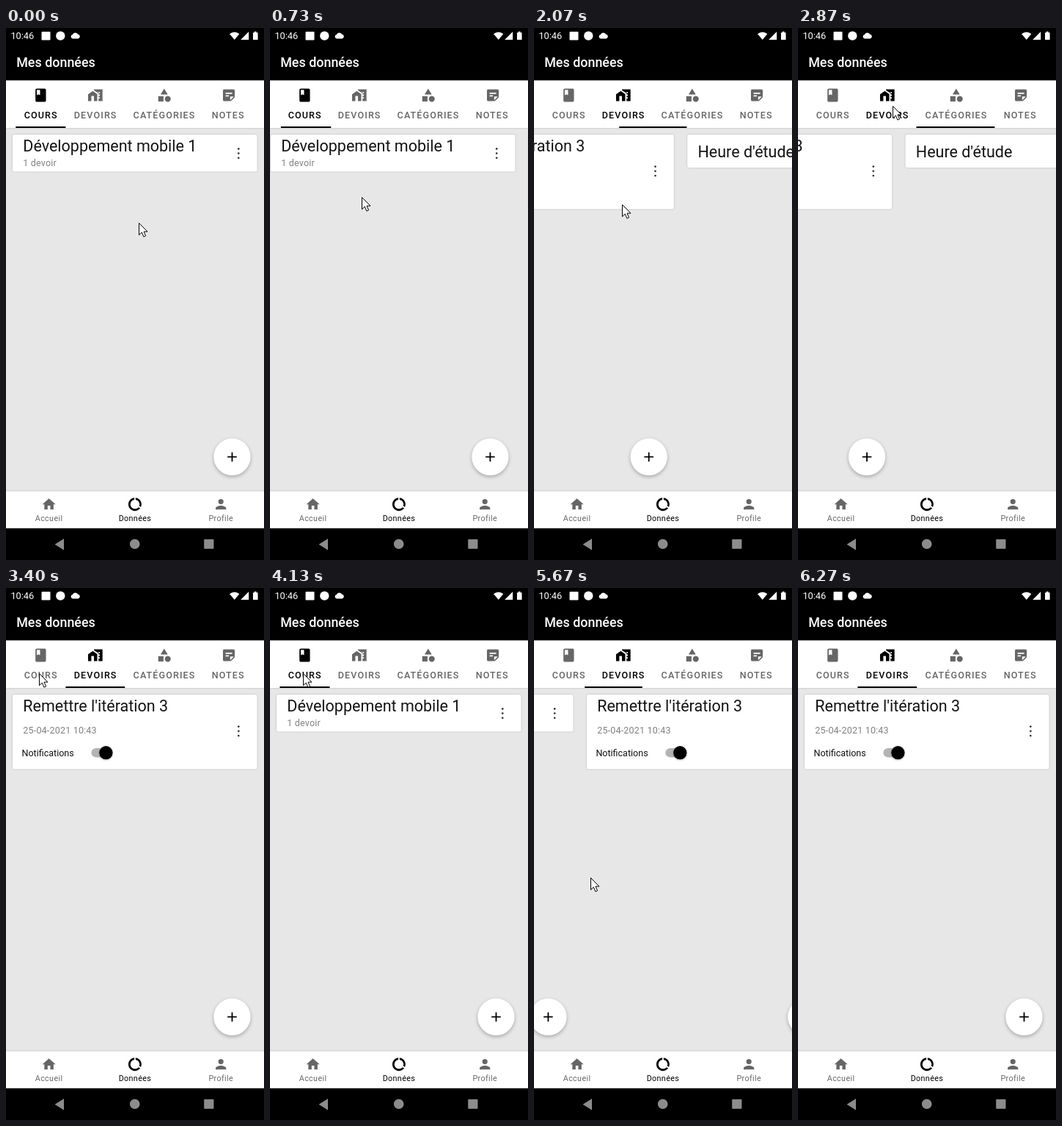
Write an HTML page that moves like this. It is 352 px wide and 724 px high and loops after 6.79 s.

```html
<!DOCTYPE html>
<html lang="fr">
<head>
<meta charset="utf-8">
<title>Mes données</title>
<style>
  html, body { margin: 0; width: 100%; height: 100%; overflow: hidden; background: #e7e7e7; }
  svg { display: block; width: 352px; height: 724px; font-family: Roboto, sans-serif; }
  .head { font-size: 17.9px; font-weight: 500; fill: #fff; }
  .tab { fill: #666; }
  .tab text { font-size: 12.54px; font-weight: 500; letter-spacing: .0893em; }
  .nav { fill: #666; }
  .nav text { font-size: 10.75px; letter-spacing: .0333em; text-anchor: middle; }
  .tab.on, .nav.on { fill: #000; }
  .card { fill: #fff; filter: drop-shadow(0 .8px .9px rgba(0, 0, 0, .22)); }
  .title { font-size: 21.5px; fill: #141414; }
  .sub { font-size: 12.54px; letter-spacing: .0145em; fill: #808080; }
  .label { font-size: 12.54px; fill: #111; }
  .fab circle { fill: #fff; filter: drop-shadow(0 2.5px 2.5px rgba(0, 0, 0, .28)); }
  .fab path { stroke: #000; stroke-width: 1.8; }
  .thumb { filter: drop-shadow(0 1px 1px rgba(0, 0, 0, .3)); }
  .bar { fill: #fff; filter: drop-shadow(0 .5px 1px rgba(0, 0, 0, .25)); }
</style>
</head>
<body>
<svg viewBox="0 0 352 724">
  <defs>
    <g id="fab" class="fab"><circle cx="308.5" cy="583.7" r="25.1"/><path d="M302.2 583.7h12.6M308.5 577.4v12.6"/></g>
    <g id="dots" fill="#333"><circle cy="-6.2" r="1.35"/><circle r="1.35"/><circle cy="6.2" r="1.35"/></g>
  </defs>

  <rect width="352" height="724" fill="#e7e7e7"/>
  <g id="pages">
    <g>
      <rect class="card" x="9" y="145" width="333.6" height="50.6" rx="2.5"/>
      <text class="title" x="23.3" y="168">Développement mobile 1</text>
      <text class="sub" x="23.3" y="187.5">1 devoir</text>
      <use href="#dots" x="317.3" y="170.6"/>
      <use href="#fab"/>
    </g>
    <g transform="translate(352)">
      <rect class="card" x="9" y="145" width="333.6" height="101.4" rx="2.5"/>
      <text class="title" x="23.3" y="168">Remettre l'itération 3</text>
      <text class="sub" x="23.3" y="198.3">25-04-2021 10:43</text>
      <use href="#dots" x="317.3" y="194.8"/>
      <text class="label" x="21.5" y="228.8">Notifications</text>
      <rect x="116.5" y="218" width="27" height="12.4" rx="6.2" fill="#b3b3b3"/>
      <circle class="thumb" cx="136.4" cy="224.2" r="9.1"/>
      <use href="#fab"/>
    </g>
    <g transform="translate(704)">
      <rect class="card" x="9" y="145" width="333.6" height="45" rx="2.5"/>
      <text class="title" x="23.3" y="176">Heure d'étude</text>
      <use href="#fab"/>
    </g>
  </g>

  <rect class="bar" y="70" width="352" height="66"/>
  <rect width="352" height="71.3"/>
  <g fill="#fff">
    <text x="6.4" y="15.3" font-size="12.8">10:46</text>
    <rect x="48.5" y="5" width="12" height="11.5" rx="1"/>
    <circle cx="74.3" cy="10.6" r="6.2"/>
    <path d="M91 14.5a2.8 2.8 0 0 1-.3-5.5a4 4 0 0 1 7.3-.4a3 3 0 0 1 .6 5.9z"/>
    <path d="M305 8Q311.7 2.8 318.4 8L311.7 16z"/>
    <path d="M331.2 5v11h-11z"/>
    <path d="M337 6.2h2v-1.4h2.6v1.4h2v9.9h-6.6z"/>
  </g>
  <text class="head" x="14.2" y="53.4">Mes données</text>

  <g id="tabs"></g>
  <rect id="line" y="134" height="2"/>

  <rect class="bar" y="630.4" width="352" height="52"/>
  <g id="nav"></g>
  <rect y="680.8" width="352" height="43.2"/>
  <g fill="#8c8c8c">
    <path d="M79 695v15.4l-12.4-7.7z"/>
    <circle cx="175.7" cy="702.3" r="6.8"/>
    <rect x="270.2" y="695.8" width="13.2" height="13" rx=".8"/>
  </g>
  <path id="cursor" d="M.5.5v16.2l3.8-3.6l2.6 6l2.7-1.2l-2.6-5.8h5z" fill="#fff" stroke="#000"/>
</svg>
<script>
  const WIDTH = 352, LOOP = 6790, FPS = 15;
  const byId = id => document.getElementById(id);
  const lerp = (a, b, k) => a + (b - a) * k;
  const clamp = k => Math.min(1, Math.max(0, k));

  const icons = {
    book: 'M18 2H6c-1.1 0-2 .9-2 2v16c0 1.1.9 2 2 2h12c1.1 0 2-.9 2-2V4c0-1.1-.9-2-2-2zM6 4h5v8l-2.5-1.5L6 12z',
    homework: 'M8.2 5.7L1 10.5V21h5v-8h4v8h5V10.3zM10 3v1.5L13.7 7H15v.9l2 1.3V21h6V3zM17 7h2v2h-2zM17 11h2v2h-2zM17 15h2v2h-2z',
    category: 'M12 2l-5.5 9h11zM3 13.5h8v8H3zM17.5 13a4.5 4.5 0 1 0 .01 0z',
    note: 'M19 3H5c-1.1 0-2 .9-2 2v14c0 1.1.9 2 2 2h10l6-6V5c0-1.1-.9-2-2-2zM7 8h10v2H7zM12 14H7v-2h5zM14 19.5V14h5.5z',
    home: 'M10 20v-6h4v6h5v-8h3L12 3 2 12h3v8z',
    data: 'M13 2.05v3.03a7 7 0 0 1 5.52 9.46l2.6 1.53A10 10 0 0 0 13 2.05zM12 19a7 7 0 0 1-1-13.92V2.05a10 10 0 1 0 9.05 15.86l-2.6-1.53A7 7 0 0 1 12 19z',
    person: 'M12 12a4 4 0 1 0 0-8a4 4 0 0 0 0 8zM12 14c-2.67 0-8 1.34-8 4v2h16v-2c0-2.66-5.33-4-8-4z'
  };
  const icon = (name, cx, cy) =>
    `<path fill-rule="evenodd" transform="translate(${cx - 10.75} ${cy - 10.75}) scale(.896)" d="${icons[name]}"/>`;

  const edges = [13.3, 81.4, 162.2, 269.4, 338.7];
  byId('tabs').innerHTML = [['book', 'COURS'], ['homework', 'DEVOIRS'], ['category', 'CATÉGORIES'], ['note', 'NOTES']]
    .map(([name, text], i) => `<g class="tab">${icon(name, (edges[i] + edges[i + 1]) / 2, 91.5)}` +
      `<text x="${edges[i] + 11.4}" y="123">${text}</text></g>`).join('');
  byId('nav').innerHTML = [['home', 'Accueil'], ['data', 'Données'], ['person', 'Profile']]
    .map(([name, text], i) => {
      const x = 58.6 + 117.3 * i;
      return `<g class="nav${i === 1 ? ' on' : ''}">${icon(name, x, 648.2)}<text x="${x}" y="671.3">${text}</text></g>`;
    }).join('');
  const tabs = [...document.querySelectorAll('.tab')];

  // Pointer path: time, x, y
  const path = [
    [0, 181, 265], [330, 172, 242], [667, 146, 231], [733, 125, 230], [1090, 30, 236],
    [1467, 258, 254], [1733, 282, 256], [1800, 282, 256], [2067, 120, 240], [2533, 130, 131],
    [2667, 129, 106], [3000, 129, 106], [3400, 45, 116], [4867, 45, 116], [5230, 184, 300],
    [5333, 153, 307], [5530, 45, 312], [6200, 200, 712], [6267, 206, 745]
  ];
  function pointer(t) {
    const i = path.findIndex(p => p[0] > t);
    if (i < 0) return path[path.length - 1].slice(1);
    const a = path[i - 1], b = path[i], k = (t - a[0]) / (b[0] - a[0]);
    return [lerp(a[1], b[1], k), lerp(a[2], b[2], k)];
  }

  // A swipe has a down time and the x where dragging takes hold; a tap only a release time
  const moves = [
    { from: 0, to: 1, down: 667, up: 1090, hold: 133 },
    { from: 1, to: 2, down: 1800, up: 2067, hold: 272 },
    { from: 2, to: 1, up: 2847.8 },
    { from: 1, to: 0, up: 3847.8 },
    { from: 0, to: 1, down: 5267, up: 5530, hold: 168 }
  ];
  const quintOut = k => 1 - (1 - clamp(k)) ** 5;
  function fastOutSlowIn(k) {
    let lo = 0, hi = 1;
    for (let i = 0; i < 16; i++) {
      const s = (lo + hi) / 2;
      if (1.2 * s * (1 - s) ** 2 + .6 * s * s * (1 - s) + s ** 3 < k) lo = s; else hi = s;
    }
    return lo * lo * (3 - 2 * lo);
  }

  function state(t) {
    let page = 0, line = 0, tab = 0;
    for (const m of moves) {
      const swipe = 'down' in m;
      if (t < (swipe ? m.down : m.up)) break;
      const drag = swipe ? Math.max(0, m.hold - pointer(Math.min(t, m.up))[0]) / WIDTH : 0;
      page = line = m.from + drag;
      if (t < m.up) continue;
      tab = m.to;
      page = lerp(page, m.to, quintOut((t - m.up) / (swipe ? 600 : 200)));
      line = swipe ? page : lerp(m.from, m.to, fastOutSlowIn(clamp((t - m.up) / 300)));
    }
    return { page, line, tab };
  }

  function edgeAt(pos) {
    const i = Math.floor(pos);
    return lerp(edges[i], edges[i + 1], pos - i);
  }

  function draw(now) {
    // The screen refreshes at a fixed, low rate
    const t = Math.floor((now % LOOP + 5) * FPS / 1000) * 1000 / FPS;
    const { page, line, tab } = state(t);
    byId('pages').setAttribute('transform', `translate(${-page * WIDTH})`);
    const left = edgeAt(line);
    byId('line').setAttribute('x', left);
    byId('line').setAttribute('width', edgeAt(line + 1) - left);
    tabs.forEach((el, i) => el.classList.toggle('on', i === tab));
    byId('cursor').setAttribute('transform', `translate(${pointer(t).map(Math.round)})`);
  }

  const start = performance.now();
  (function tick() {
    draw(performance.now() - start);
    requestAnimationFrame(tick);
  })();
</script>
</body>
</html>
```
